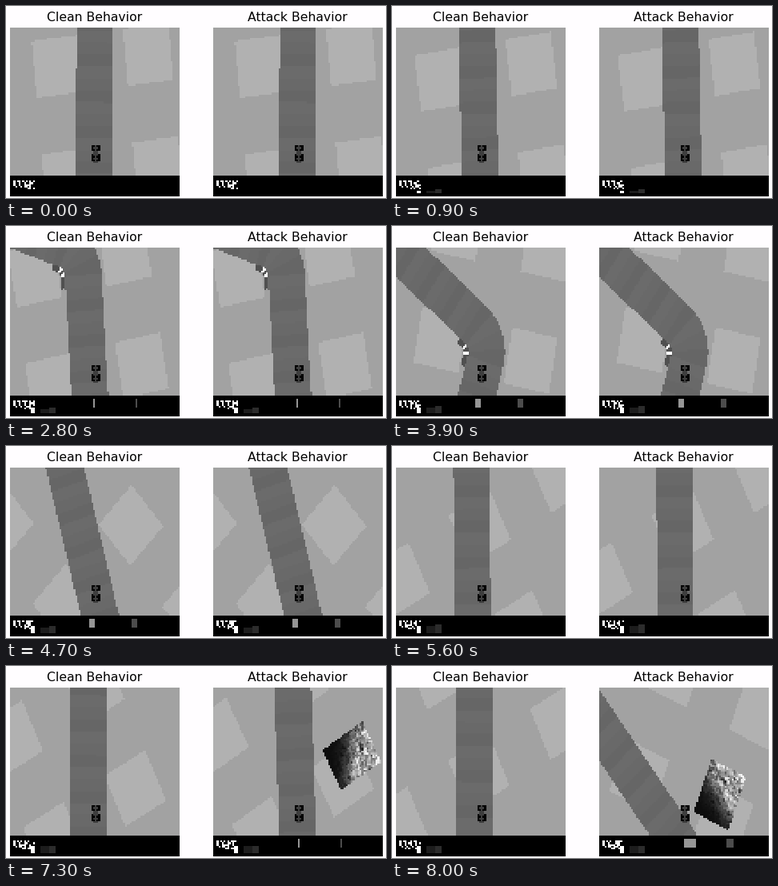
A matplotlib script that plays this animation: 475x240 px, repeating every 8.1 s.

```python
import numpy as np
import matplotlib.pyplot as plt
from matplotlib.animation import FuncAnimation

FRAMES, INTERVAL = 81, 100
N = 96                            # cells per side of each view
SCALE_X, SCALE_Y = 1.5552, 1.944  # cells per world unit
FIELD = 100 / 6                   # side of a light grass square
HALF_ROAD, CURB, TILE, BEND = 20 / 3, 1.6, 3.5, 10.0
PATCH_SIZE = np.array([13.6, 16.8])
PATCH_POS = np.array([-62.4, 147.8])


def direction(degrees):
    """Unit vector for a heading measured leftwards from world north."""
    a = np.radians(degrees)
    return np.array([-np.sin(a), np.cos(a)])


def left_of(v):
    return np.array([-v[1], v[0]])


# Track: straight, left bend, straight
IN_ANGLE, OUT_ANGLE = -6.5, 62.5
CORNER = np.array([26.3, 78.4])
D1, D2 = direction(IN_ANGLE), direction(OUT_ANGLE)
TURN = np.radians(OUT_ANGLE - IN_ANGLE)
CUT = BEND * np.tan(TURN / 2)
T1, T2 = CORNER - CUT * D1, CORNER + CUT * D2
CENTER = T1 + BEND * left_of(D1)

# Way points: frame, x, y, heading; extra turns: frame, heading
SHARED = [(0, 19.35, 14.7, -6), (16, 20.85, 24.2, -9.5), (28, 24.4, 42.3, -10.5),
          (39, 24.6, 67.8, 10.5), (47, 13.7, 84.9, 46)]
CLEAN = dict(way=SHARED + [(66, -36.5, 113.7, 63), (80, -80.7, 136.8, 63)],
             turns=[(54, 62)], patch=False)
ATTACK = dict(way=SHARED + [(66, -36.5, 113.7, 64), (80, -72.3, 137.5, 22.5)],
              turns=[(54, 62), (75, 59), (82, 8)], patch=True)

CAR = ["##g##", "#ggg#", "##g##", ".ggg.", ".ggg.",
       "#ggg#", "##g##", "#ggg#", "##g##", ".ggg."]
CAR_TONES = {"#": 0, "g": 62}

rng = np.random.default_rng(4)

# Blotchy texture, dark at the lower left and light at the upper right
TEX_ROWS, TEX_COLS = 26, 20
tv, tu = np.mgrid[-1:1:TEX_ROWS * 1j, -1:1:TEX_COLS * 1j]
noise = rng.normal(0, 1, (TEX_ROWS, TEX_COLS))
noise = (noise + np.roll(noise, 1, 0) + np.roll(noise, 1, 1)) / 1.7
level = 1 / (1 + np.exp(-4.5 * (0.9 * tv + 0.5 * tu + 0.05)))
patch_tex = np.clip(12 + level * (165 + 50 * noise), 8, 245)

# Score digits are too coarse to read: a left stroke and a few loose cells
glyphs = rng.random((10, 5, 3)) < np.array([0.75, 0.35, 0.4])

rows, cols = np.mgrid[0:N, 0:N] + 0.5
LOCAL_X = (cols - N / 2) / SCALE_X
LOCAL_Y = (0.75 * N - rows) / SCALE_Y


def speed_at(t):
    return 0.15 + 3.5 * np.sin(np.pi * t / 170)


def heading_at(drive, t):
    turns = sorted([(k[0], k[3]) for k in drive["way"]] + drive["turns"])
    return np.interp(t, *zip(*turns))


def position_at(drive, t):
    """Hermite curve through the way points, tangent to each heading."""
    way = drive["way"]
    i = max(k for k in range(len(way) - 1) if way[k][0] <= t)
    (ta, *a, ha), (tb, *b, hb) = way[i], way[i + 1]
    span = tb - ta
    u = (t - ta) / span
    blend = u * u * (3 - 2 * u)
    return ((1 - blend) * np.array(a) + blend * np.array(b)
            + span * u * (1 - u)**2 * speed_at(ta) * direction(ha)
            - span * u * u * (1 - u) * speed_at(tb) * direction(hb))


def project(x, y):
    """Distance along the track and offset to its left."""
    def along(origin, d):
        return (x - origin[0]) * d[0] + (y - origin[1]) * d[1]

    a1, a2 = along(T1, D1), along(T2, D2)
    lat1, lat2 = along(T1, left_of(D1)), along(T2, left_of(D2))
    dx, dy = x - CENTER[0], y - CENTER[1]
    arc = np.arctan2(dy, dx) - np.radians(IN_ANGLE)
    on_arc = (a1 >= 0) & (a2 <= 0)
    on_out = (a2 > 0) & ((a1 >= 0) | (np.abs(lat2) < np.abs(lat1)))
    s = np.where(on_arc, BEND * arc, np.where(on_out, BEND * TURN + a2, a1))
    lat = np.where(on_arc, BEND - np.hypot(dx, dy), np.where(on_out, lat2, lat1))
    return s, lat


def paint_world(pos, heading, with_patch):
    ahead = direction(heading)
    right = -left_of(ahead)
    x = pos[0] + LOCAL_X * right[0] + LOCAL_Y * ahead[0]
    y = pos[1] + LOCAL_X * right[1] + LOCAL_Y * ahead[1]
    light = (x % (2 * FIELD) < FIELD) & (y % (2 * FIELD) < FIELD)
    img = np.where(light, 177.0, 162.0)

    s, lat = project(x, y)
    tile = np.floor(s / TILE).astype(int)
    road = np.abs(lat) < HALF_ROAD
    img[road] = (102 + 2.6 * (tile % 3))[road]
    curb = (lat >= HALF_ROAD) & (lat < HALF_ROAD + CURB) & (tile >= -1) & (tile <= 3)
    img[curb] = np.where(tile % 2 == 0, 255, 80)[curb]

    if with_patch:
        u = (x - PATCH_POS[0]) / PATCH_SIZE[0] + 0.5
        v = (y - PATCH_POS[1]) / PATCH_SIZE[1] + 0.5
        inside = (u >= 0) & (u < 1) & (v >= 0) & (v < 1)
        img[inside] = patch_tex[(v[inside] * TEX_ROWS).astype(int),
                                (u[inside] * TEX_COLS).astype(int)]
    return img


def paint_car(img):
    for r, line in enumerate(CAR):
        for c, ch in enumerate(line):
            if ch in CAR_TONES:
                img[67 + r, 46 + c] = CAR_TONES[ch]


def paint_gauge(img, base, width, tone):
    end = base + int(round(width))
    img[86:91, min(base, end):max(base, end)] = tone


def paint_panel(img, drive, t, pos):
    img[84:] = 0
    score = int(max(project(*pos)[0] + 75, 0))
    for k, digit in enumerate(f"{score:04d}"):
        c = 2 + 3 * k
        img[87:92, c:c + 3] = 255 * glyphs[int(digit)]

    moving = t > 3
    front = moving * int(round(1.03 * speed_at(t) + 0.4))
    rear = front + (moving and t < 60)
    img[94 - front:94, 12:14] = 255
    img[94 - front:94, 17:22] = 29
    img[94 - rear:94, 22:26] = 45

    turn = (heading_at(drive, t - 1) - heading_at(drive, t + 1)) / 2
    paint_gauge(img, 48, turn, 150)
    paint_gauge(img, 72, np.clip(turn, -3, 4), 76)


def render(drive, t):
    pos = position_at(drive, t)
    img = paint_world(pos, heading_at(drive, t), drive["patch"])
    paint_car(img)
    paint_panel(img, drive, t, pos)
    return img


fig = plt.figure(figsize=(4.75, 2.4), dpi=100, facecolor="#fffdff")
views = []
for left, title, drive in [(5, "Clean Behavior", CLEAN), (259, "Attack Behavior", ATTACK)]:
    ax = fig.add_axes([left / 475, 2.4 / 240, 211.4 / 475, 211 / 240])
    ax.set_title(title, fontsize=11.25, fontname="DejaVu Sans", pad=5.8)
    ax.axis("off")
    picture = ax.imshow(render(drive, 0), cmap="gray", vmin=0, vmax=255,
                        interpolation="nearest", aspect="auto")
    views.append((picture, drive))


def update(t):
    for picture, drive in views:
        picture.set_data(render(drive, t))
    return [picture for picture, _ in views]


anim = FuncAnimation(fig, update, frames=FRAMES, interval=INTERVAL,
                     repeat=True, repeat_delay=0, blit=False)
plt.show()
```
